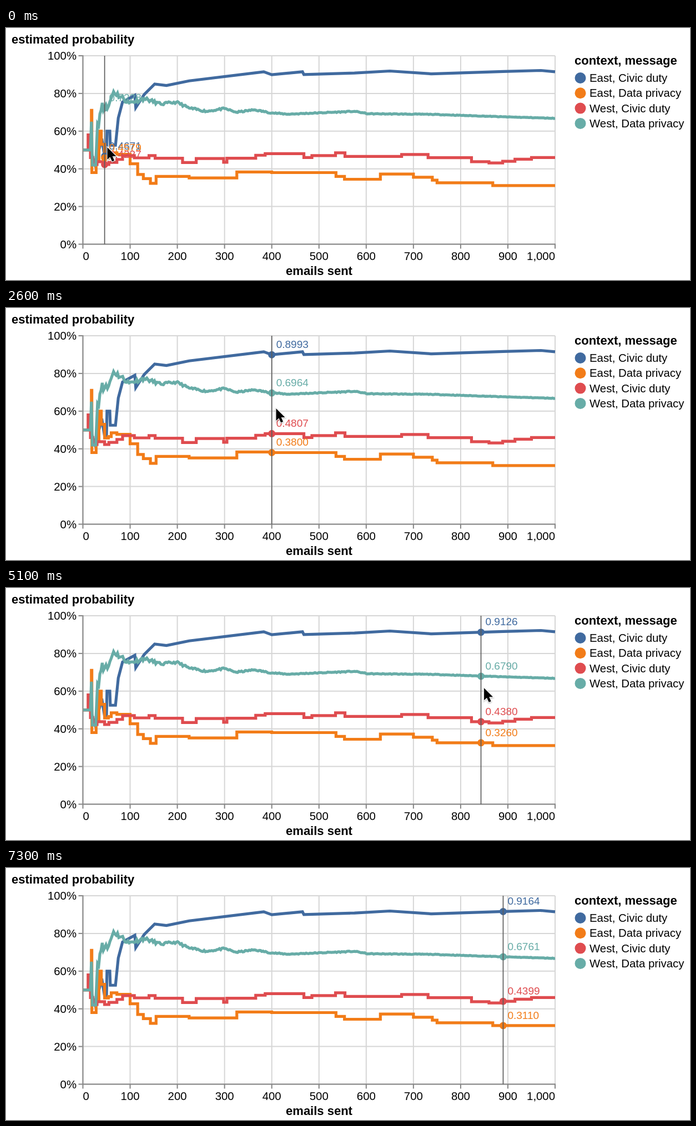
An HTML page for the animation above (8.2 s loop, 1232 by 454 pixels).

```html
<!DOCTYPE html>
<html lang="en">
<head>
<meta charset="utf-8">
<title>Estimated probability by emails sent</title>
<style>
  html, body { margin: 0; width: 100%; height: 100%; overflow: hidden; background: #fff; }
  svg {
    display: block; width: 1232px; height: 454px; font-kerning: none;
    font: 20.35px "Liberation Sans", Arial, sans-serif;
  }
  .title { font-size: 22px; font-weight: bold; }
  .value { font-size: 19px; }
  .grid { stroke: #d6d6d6; stroke-width: 2; }
  .axis { stroke: #858585; stroke-width: 2; }
  .line { fill: none; stroke-width: 5.2; }
  #rule { stroke: #5c5c5c; stroke-width: 1.7; }
  #cursor { filter: drop-shadow(0 1px 1px rgba(0, 0, 0, .3)); }
</style>
</head>
<body>
<svg id="chart" viewBox="0 0 1232 454"></svg>
<script>
const LEFT = 138.5, WIDTH = 850.5, TOP = 50, HEIGHT = 339.5;
const RIGHT = LEFT + WIDTH, BOTTOM = TOP + HEIGHT;
const LOOP = 8200, STEP = 100;
const px = n => LEFT + n * WIDTH / 1000;
const py = percent => BOTTOM - percent * HEIGHT / 100;
const chart = document.getElementById('chart');

function add(tag, attrs, text) {
  const el = document.createElementNS('http://www.w3.org/2000/svg', tag);
  for (const k in attrs) el.setAttribute(k, attrs[k]);
  if (text) el.textContent = text;
  return chart.appendChild(el);
}
const seg = (cls, x1, y1, x2, y2) => add('line', { class: cls, x1, y1, x2, y2 });
const label = (text, x, y, anchor = 'start', cls = '') =>
  add('text', { x, y, 'text-anchor': anchor, class: cls }, text);

// Turning points: emails sent, percent. Stepped series hold each value until the next.
const series = [
  {
    name: 'East, Civic duty', color: '#406a9f',
    points: [[0, 50], [16, 50], [26, 42], [40, 56], [46, 46.71], [50, 47], [51, 60], [57, 60], [58, 52.5],
      [69, 52.5], [75, 67], [84, 75.5], [110, 79], [112, 72.5], [130, 79.5], [152, 85], [177, 84.2],
      [225, 86.66], [383, 91.5], [400, 89.93], [465, 91.5], [468, 90], [575, 90.86], [650, 91.9],
      [738, 90.4], [890, 91.64], [970, 92.2], [1000, 91.5]]
  },
  {
    name: 'East, Data privacy', color: '#f27c18', stepped: true,
    points: [[0, 50], [18, 71], [19, 38], [28, 44], [34, 60], [39, 53], [46, 45.79], [54, 46.5], [60, 48.5],
      [72, 47.7], [100, 42.7], [116, 37], [128, 34.8], [143, 32.3], [155, 36], [225, 35.15], [326, 38.3],
      [400, 38], [536, 36], [554, 34.46], [630, 37.2], [700, 35.52], [740, 34], [750, 32.6], [868, 31.1]]
  },
  {
    name: 'West, Civic duty', color: '#df4c4f', stepped: true,
    points: [[0, 50], [11, 58], [16, 46], [21, 42.3], [30, 43.8], [46, 42.27], [55, 43.4], [72, 45],
      [84, 47], [109, 45.8], [140, 47], [153, 45.6], [211, 43.35], [240, 45.5], [298, 43.5], [305, 45.6],
      [366, 47.2], [386, 48.07], [468, 46], [485, 47], [535, 48.5], [555, 46.59], [675, 47.6], [731, 45.9],
      [823, 43.8], [860, 43.1], [889, 43.99], [915, 45.1], [950, 46]]
  },
  {
    name: 'West, Data privacy', color: '#67aca7', jitter: 125,
    points: [[0, 50], [16, 50], [18, 65], [20, 42], [27, 42], [31, 64], [41, 75], [46, 72.28], [52, 72],
      [65, 81], [98, 75], [130, 77.3], [165, 74.3], [198, 75.4], [225, 72.25], [262, 70.5], [300, 72],
      [325, 70], [363, 71.3], [400, 69.64], [435, 69], [575, 70.5], [605, 69.2], [738, 68.92], [890, 67.61],
      [1000, 66.8]]
  }
];

let seed = 11;
const random = () => (seed = seed * 16807 % 2147483647) / 2147483647;

// Seeded noise that calms down as the sample grows; turning points stay put.
function roughen(points, amount) {
  return points.flatMap(([b, q], i) => {
    if (!i) return [[b, q]];
    const [a, p] = points[i - 1], count = a < 30 ? 1 : Math.round((b - a) / 2.7);
    return Array.from({ length: count }, (_, j) => {
      const u = (j + 1) / count, n = a + (b - a) * u;
      return u === 1 ? [b, q] : [n, p + (q - p) * u + (random() * 2 - 1) * amount / n];
    });
  });
}

function percentAt({ points, stepped }, n) {
  const i = points.findLastIndex(p => p[0] <= n);
  const [a, p] = points[i], [b, q] = points[i + 1] || [a + 1, p];
  return stepped ? p : p + (q - p) * (n - a) / (b - a);
}

// Monotone cubic through [time, value] keys.
function glide(keys) {
  const rate = i => (keys[i + 1][1] - keys[i][1]) / (keys[i + 1][0] - keys[i][0]);
  const slope = keys.map((_, i) => {
    if (!i || i === keys.length - 1) return 0;
    const a = rate(i - 1), b = rate(i);
    return a * b > 0 ? 2 * a * b / (a + b) : 0;
  });
  return t => {
    const i = keys.findLastIndex(k => k[0] <= t);
    if (i === keys.length - 1) return keys[i][1];
    const [t0, a] = keys[i], [t1, b] = keys[i + 1], d = t1 - t0, u = (t - t0) / d, v = 1 - u;
    return a * v * v * (1 + 2 * u) + b * u * u * (3 - 2 * u) + d * u * v * (slope[i] * v - slope[i + 1] * u);
  };
}

// Grid, axes and legend
for (let i = 0; i <= 5; i++) {
  const y = py(i * 20);
  seg('grid', LEFT, y, RIGHT, y);
  seg('axis', LEFT - 8, y, LEFT, y);
  label(i * 20 + '%', 127, y + 7.2, 'end');
}
for (let i = 0; i <= 10; i++) {
  const x = px(i * 100);
  seg('grid', x, TOP, x, BOTTOM);
  seg('axis', x, BOTTOM, x, BOTTOM + 8);
  label((i * 100).toLocaleString('en-US'), x, 418, i === 0 ? 'start' : i === 10 ? 'end' : 'middle');
}
seg('axis', LEFT, TOP - 1, LEFT, BOTTOM);
seg('axis', LEFT - 1, BOTTOM, RIGHT + 1, BOTTOM);
label('estimated probability', 10, 28, 'start', 'title');
label('emails sent', 564, 445, 'middle', 'title');
label('context, message', 1024, 66, 'start', 'title');

series.forEach((s, i) => {
  const y = 90 + 27.3 * i;
  add('circle', { cx: 1034.5, cy: y, r: 10, fill: s.color });
  label(s.name, 1051, y + 7);
  if (s.jitter) s.points = roughen(s.points, s.jitter);
  const to = (x, y) => s.stepped ? `H${x}V${y}` : `L${x} ${y}`;
  const d = s.points.map(([n, p], j) => j ? to(px(n), py(p)) : `M${px(n)} ${py(p)}`).join('');
  add('path', { class: 'line', d: s.stepped ? d + `H${RIGHT}` : d, stroke: s.color });
});
for (const s of series) s.dot = add('circle', { r: 6.5, fill: s.color });
for (const s of series) s.value = add('text', { class: 'value', fill: s.color });

const rule = add('line', { id: 'rule', y1: TOP, y2: BOTTOM });
const cursor = add('path', {
  id: 'cursor', d: 'M0 0V22L5 17.5L8.7 25.5L12.6 23.8L9.2 16H16Z',
  stroke: '#fff', 'stroke-width': 2.2, 'paint-order': 'stroke'
});

// Time, emails sent under the rule, pointer x, pointer y
const stops = [
  [0, 46, 182.5, 215], [1600, 225, 340.5, 183], [2600, 400, 486.5, 181], [3400, 575, 641.5, 189],
  [4400, 738, 776.5, 184.5], [5700, 890, 898.5, 175.5], [6300, 890, 898, 166], [7000, 890, 896, -45]
];
const [ruleN, cursorX, cursorY] = [1, 2, 3].map(c => glide(stops.map(s => [s[0], s[c]])));

function draw(now) {
  const t = Math.floor(now % LOOP / STEP) * STEP;
  const n = ruleN(t), x = px(n);
  rule.setAttribute('x1', x);
  rule.setAttribute('x2', x);
  for (const s of series) {
    const percent = percentAt(s, n), y = py(percent);
    s.dot.setAttribute('cx', x);
    s.dot.setAttribute('cy', y);
    s.value.setAttribute('x', x + 8);
    s.value.setAttribute('y', y - 12.2);
    s.value.textContent = (percent / 100).toFixed(4);
  }
  cursor.setAttribute('transform', `translate(${cursorX(t)} ${cursorY(t)})`);
}

const start = performance.now();
function tick() {
  draw(performance.now() - start);
  requestAnimationFrame(tick);
}
tick();
</script>
</body>
</html>
```
